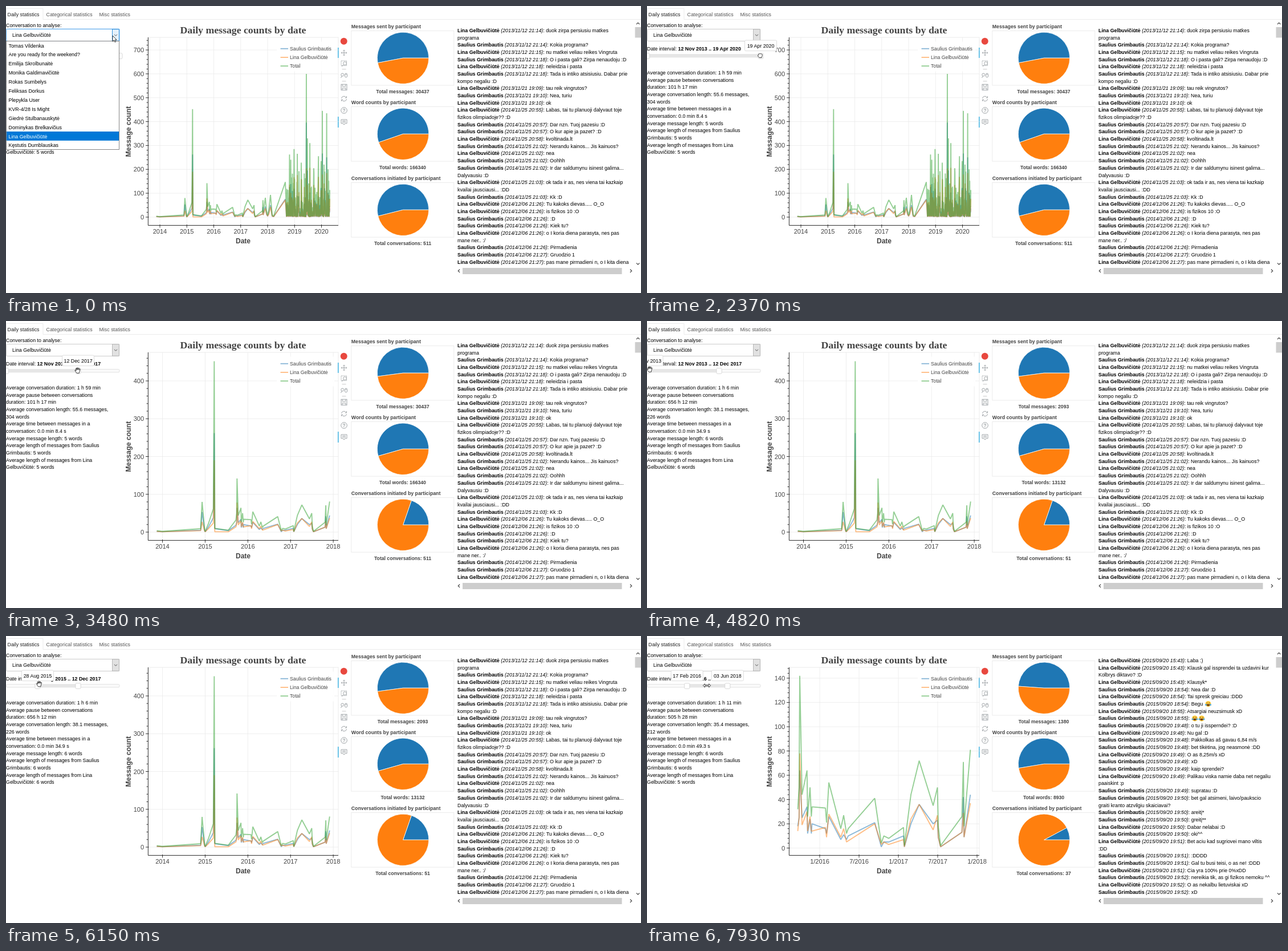
Recreate the animation shown at these times as an HTML page. Size 1114 by 503 pixels, loop 7.99 s.

```html
<!DOCTYPE html>
<html lang="lt">
<head>
<meta charset="utf-8">
<title>Daily statistics</title>
<style>
html, body { margin: 0; width: 100%; height: 100%; overflow: hidden; background: #fff; }
svg { display: block; font: 8.85px Arial, "Liberation Sans", sans-serif; }
.b { font-weight: bold; }
.i { font-style: italic; }
.m { text-anchor: middle; }
.e { text-anchor: end; }
.ink { fill: #444; }
.line { fill: none; stroke-width: 1.9; stroke-opacity: .5; stroke-linejoin: bevel; }
.icon { fill: none; stroke: #a1a6a9; stroke-width: 1; }
.cur { fill: #fff; stroke: #000; stroke-width: .75; stroke-linejoin: round; }
</style>
</head>
<body>
<svg id="stage" width="1114" height="503" viewBox="0 0 1114 503">
  <defs><clipPath id="plot"><rect x="249" y="55" width="334" height="329"/></clipPath></defs>
  <g id="frame"></g>
  <g id="chart"></g>
  <g id="legend"></g>
  <g id="pies"></g>
  <g id="totals"></g>
  <g id="stats"></g>
  <g id="log"></g>
  <g id="picker"></g>
  <g id="slider"></g>
  <g id="menu"></g>
  <g id="cursor"></g>
</svg>
<script>
const LOOP = 7990, SPAN = 2350;
const SAULIUS = 'Saulius Grimbautis', LINA = 'Lina Gelbuvičiūtė';
const BLUE = '#1f77b4', ORANGE = '#ff7f0e', GREEN = '#2ca02c';

const $ = id => document.getElementById(id);
const text = (x, y, s, cls = '', more = '') => `<text x="${x}" y="${y}" class="${cls}" ${more}>${s}</text>`;
const rect = (x, y, w, h, more = '') => `<rect x="${x}" y="${y}" width="${w}" height="${h}" ${more}/>`;
const path = (d, more = '') => `<path d="${d}" ${more}/>`;
const size = n => `font-size="${n}"`;

// Redraws a group only when its content changes.
const drawn = {};
function put(id, html) {
  if (drawn[id] !== html) $(id).innerHTML = drawn[id] = html;
}

/* ---------- chart ---------- */
const months = ['1/2016', '7/2016', '1/2017', '7/2017', '1/2018'];
const years = (a, b) => Array.from({ length: b - a + 1 }, (_, i) => [a + i, a + i]);
const views = [
  { year: 2014, x: 270, w: 47.25, y: 370, u: .4185, step: 100, max: 700, from: 0, to: 2021, ticks: years(2014, 2020) },
  { year: 2014, x: 274.5, w: 74.9, y: 370, u: .6625, step: 100, max: 400, from: 0, to: 2017.92, ticks: years(2014, 2018) },
  { year: 2016, x: 303, w: 138, y: 371.7, u: 2.127, step: 20, max: 140, from: 2015.71, to: 2017.92,
    ticks: months.map((s, i) => [2016 + i / 2, s]) }
];

// Triplets: plot x in the given view, total, first person's share.
function points(v, list) {
  const out = [];
  for (let i = 0; i < list.length; i += 3)
    out.push([v.year + (list[i] - v.x) / v.w, list[i + 1], list[i + 2]]);
  return out;
}

function busyDays() {
  const gap = .36;
  let seed = 4711;
  const rnd = () => (seed = seed * 16807 % 2147483647) / 2147483647;
  const peaks = { 497.5: 262, 499.5: 240, 505.5: 285, 511: 265, 518: 228, 527: 600, 528.6: 330, 533: 310,
    540: 205, 548: 255, 553: 235, 555: 445, 558: 220, 562.5: 435, 565: 200 };
  const list = [];
  for (let x = 492; x < 568; x += gap) {
    const top = Object.keys(peaks).find(p => Math.abs(p - x) <= gap / 2);
    const n = top ? peaks[top] : 3 + 190 * rnd() ** 3.5;
    list.push(x, n, n * (n === 600 ? .66 : .3 + .35 * rnd()));
  }
  return list;
}

const data = [
  ...points(views[1], [264.5, 4, 2, 274, 2, 1, 341.5, 9, 5, 344, 80, 53, 348.5, 6, 3, 349.5, 2, 1, 355, 22, 13,
    363.8, 62, 38, 365.3, 452, 262, 366.3, 10, 9, 390, 5, 4]),
  ...points(views[2], [264.5, 32, 18, 266.8, 50, 25, 268, 142, 64, 272, 44, 25, 280.7, 64, 34, 281.8, 26, 12,
    286, 50, 24, 288.3, 26, 12, 289.5, 34, 20, 313, 33, 16, 315, 21, 12, 319, 54, 26, 340, 16, 7, 345, 27, 11,
    350, 12, 7, 353, 16, 10, 399.5, 41, 21, 411, 4, 1, 415.5, 10, 5, 424, 8, 5, 450, 17, 10, 451.5, 2, 1,
    463, 44, 20, 477.5, 72, 36, 502, 35, 20, 509.5, 50, 23, 511, 18, 9, 515, 2, 1, 552.5, 26, 13, 555, 71, 42,
    556.2, 18, 9, 567.3, 81, 44]),
  ...points(views[0], [457, 25, 12, 459, 8, 4, 461, 30, 18, 464, 93, 50, 467, 8, 4, 469.5, 4, 2, 490, 147, 75, 491.5, 50, 26]),
  ...points(views[0], busyDays())
];

function chart(v) {
  const px = y => v.x + (y - v.year) * v.w, py = n => v.y - n * v.u;
  let grid = '', ticks = '', minor = '', labels = '';
  for (const [at, name] of v.ticks) {
    const x = px(at);
    grid += `M${x} 55V384`;
    ticks += `M${x} 383V388.5`;
    labels += text(x, 399, name, 'm ink', size(11));
  }
  for (let n = 0; py(n) > 55; n += v.step / 5) {
    const y = py(n);
    if (n % v.step) { minor += `M246.5 ${y}H249`; continue; }
    grid += `M249 ${y}H583`;
    ticks += `M245 ${y}H250.5`;
    labels += text(242, y + 4, n, 'e ink', size(11));
  }
  const shown = data.filter(p => p[0] >= v.from && p[0] <= v.to);
  const line = (pick, color) => path('M' + shown.map(p => px(p[0]).toFixed(2) + ' ' + py(pick(p)).toFixed(2)).join('L'),
    `class="line" stroke="${color}"`);
  return path(grid, 'stroke="#e9e9e9" stroke-width=".7"') +
    `<g clip-path="url(#plot)">${line(p => p[2], BLUE)}${line(p => p[1] - p[2], ORANGE)}${line(p => p[1], GREEN)}</g>` +
    path('M249.4 55V384.5H583' + ticks + minor, 'fill="none" stroke="#222" stroke-width=".9"') + labels;
}
const charts = views.map(chart);

/* ---------- pies ---------- */
const tops = [91.2, 224.3, 357.3];
const shares = [[.53, .553, .539], [.521, .544, .197], [.489, .526, .078]];
const kinds = ['messages', 'words', 'conversations'];
const sums = [[30437, 166340, 511], [2093, 13132, 51], [1380, 8930, 37]];

function pie(cy, share) {
  const r = 45.2, a = share * 2 * Math.PI, x = 696.5 + r * Math.cos(a), y = cy - r * Math.sin(a);
  const big = share > .5 ? 1 : 0;
  const wedge = (sweep, large, color) =>
    path(`M696.5 ${cy}h${r}A${r} ${r} 0 ${large} ${sweep} ${x} ${y}Z`, `fill="${color}" stroke="#fff" stroke-width=".75"`);
  return wedge(0, big, BLUE) + wedge(1, 1 - big, ORANGE);
}
const pies = shares.map(s => s.map((n, i) => pie(tops[i], n)).join(''));
const totals = sums.map(s => s.map((n, i) =>
  text(696, tops[i] + 62, `Total ${kinds[i]}: ${n}`, 'b m ink', size(8.65))).join(''));

/* ---------- left column ---------- */
const stats = [
  ['1 h 59 min', '101 h 17 min', '55.6', 304, '8.4', 5, 5, 5],
  ['1 h 6 min', '656 h 12 min', '38.1', 226, '34.9', 6, 6, 6],
  ['1 h 11 min', '505 h 28 min', '35.4', 212, '49.3', 6, 6, 5]
].map(([len, pause, msgs, words, gap, all, one, two]) => [
  `Average conversation duration: ${len}`, 'Average pause between conversations', `duration: ${pause}`,
  `Average conversation length: ${msgs} messages,`, `${words} words`, 'Average time between messages in a',
  `conversation: 0.0 min ${gap} s`, `Average message length: ${all} words`,
  'Average length of messages from ' + SAULIUS.split(' ')[0], `${SAULIUS.split(' ')[1]}: ${one} words`,
  'Average length of messages from ' + LINA.split(' ')[0], `${LINA.split(' ')[1]}: ${two} words`
].map((s, i) => text(0, 120.1 + 12.65 * i, s)).join(''));

const people = ['Tomas Vildenka', 'Are you ready for the weekend?', 'Emilija Skrolbunaitė', 'Monika Galdimavičiūtė',
  'Rokas Sumbelys', 'Feliksas Dorkus', 'Plepykla User', 'KVR-4/28 Is Might', 'Giedrė Stulbanauskytė',
  'Dominykas Brelkavičius', LINA, 'Kęstutis Dumblauskas'];
const menu = rect(.5, 61.5, 198, 190, 'fill="#fff" stroke="#7a7a7a" stroke-width=".9"') +
  rect(1, 220, 197, 15.9, 'fill="#0078d7"') +
  people.map((s, i) => text(4.5, 72.5 + 15.9 * i, s, '', i === 10 ? 'fill="#fff"' : '')).join('');

function picker(focus) {
  const edge = focus ? '#5aaaec' : '#ccc';
  return (focus ? rect(-1, 39.2, 201, 23.8, 'rx="3" fill="#d3e8fa"') : '') +
    rect(.5, 40.5, 198, 21, `rx="2" fill="#fff" stroke="${edge}" stroke-width="1"`) +
    rect(186.5, 40.8, 12, 20.4, focus ? 'fill="#e5f1fb" stroke="#0078d7" stroke-width=".8"' : 'fill="#e1e1e1" stroke="#adadad" stroke-width=".8"') +
    path('M190 49.8L192.5 52.3L195 49.8', 'fill="none" stroke="#444" stroke-width=".9"') + text(11, 54.2, LINA);
}

const pos = day => day * 199.5 / SPAN;
const date = day => new Date(Date.UTC(2013, 10, 12 + Math.round(day)))
  .toLocaleDateString('en-GB', { day: '2-digit', month: 'short', year: 'numeric', timeZone: 'UTC' });
const handle = x => rect(x - 4.6, 82.8, 9.2, 9.6, 'rx="2" fill="#fff" stroke="#d0d0d0" stroke-width=".8"');
const tip = day => rect(pos(day) - 28, 60, 56, 18.6, 'rx="2" fill="#fff" stroke="#d4d4d4" stroke-width=".8"') +
  text(pos(day), 72.6, date(day), 'm');

function slider(a, b, tipA, tipB) {
  return text(0, 77.6, `Date interval: <tspan class="b">${date(a)} .. ${date(b)}</tspan>`) +
    rect(.3, 84.7, 198.8, 5.2, 'rx="2" fill="#fafafa" stroke="#d6d6d6" stroke-width=".7"') +
    rect(pos(a), 85, pos(b) - pos(a), 4.6, 'fill="#e6e6e6"') +
    handle(pos(a)) + handle(pos(b)) + (tipA ? tip(a) : '') + (tipB ? tip(b) : '');
}

/* ---------- message log: S / L is the speaker, a leading space continues ---------- */
const logs = [`L2013/11/12 21:14 duok zirpa persiusiu matkes
 programa
S2013/11/12 21:14 Kokia programa?
L2013/11/12 21:15 nu matkei veliau reikes Vingruta
S2013/11/12 21:18 O i pasta gali? Zirpa nenaudoju :D
L2013/11/12 21:18 neleidzia i pasta
S2013/11/12 21:18 Tada is intiko atsisiusiu. Dabar prie
 kompo negaliu :D
L2013/11/21 19:09 tau reik vingrutos?
S2013/11/21 19:10 Nea, turiu
L2013/11/21 19:10 ok
L2014/11/25 20:55 Labas, tai tu planuoji dalyvaut toje
 fizikos olimpiadoje?? :D
S2014/11/25 20:57 Dar nzn. Tuoj pazesiu :D
S2014/11/25 20:57 O kur apie ja pazet? :D
L2014/11/25 20:58 kvoltinada.lt
S2014/11/25 21:02 Nerandu kainos... Jis kainuos?
L2014/11/25 21:02 nea
S2014/11/25 21:02 Oohhh
S2014/11/25 21:02 Ir dar saldumynu isinest galima...
 Dalyvausiu :D
L2014/11/25 21:03 ok tada ir as, nes viena tai kazkaip
 kvailai jausciausi... :DD
S2014/11/25 21:03 Kk :D
L2014/12/06 21:26 Tu kakoks dievas..... O_O
L2014/12/06 21:26 is fizikos 10 :O
S2014/12/06 21:26 :D
S2014/12/06 21:26 Kiek tu?
L2014/12/06 21:26 o I koria diena parasyta, nes pas
 mane ner.. :/
S2014/12/06 21:26 Pirmadienia
S2014/12/06 21:27 Gruodzio 1
L2014/12/06 21:27 pas mane pirmadieni n, o I kita diena`,
`L2015/09/20 15:43 Laba :)
L2015/09/20 15:43 Klausk gal issprendei ta uzdavini kur
 Kolbrys diktavo? :D
L2015/09/20 15:43 Klausyk*
S2015/09/20 18:54 Nea dar :D
L2015/09/20 18:54 Tai spresk greiciau :DDD
S2015/09/20 18:54 Begu
L2015/09/20 18:55 Atsargiai neuzsimusk xD
S2015/09/20 18:55 
S2015/09/20 19:48 o tu ji issperndei? :D
L2015/09/20 19:48 Nu gal :D
S2015/09/20 19:48 Pakkolkas aš gavau 6,84 m/s
S2015/09/20 19:48 bet tikėtina, jog neasmonė :DD
L2015/09/20 19:49 O as 8,25m/s xD
S2015/09/20 19:49 xD
S2015/09/20 19:49 kaip sprendei?
L2015/09/20 19:49 Palikau viska namie daba net negaliu
 paaiskint :p
S2015/09/20 19:49 supratau :D
S2015/09/20 19:50 bet gal atsimeni, laivo/paukscio
 graiti kranto atzvilgiu skaiciavai?
S2015/09/20 19:50 areitį*
S2015/09/20 19:50 greitį**
L2015/09/20 19:50 Dabar nelabai :D
S2015/09/20 19:50 oki^^
L2015/09/20 19:51 Bet aciu kad sugriovei mano viltis
 :DD
S2015/09/20 19:51 :DDDD
S2015/09/20 19:51 Gal tu busi teisi, o as ne! :DDD
L2015/09/20 19:51 Cia yra 100% prie 0%xDD
S2015/09/20 19:52 nereikia tik, as gi fizikos nemoku ^^
L2015/09/20 19:52 O as nekalbu lietuviskai xD
S2015/09/20 19:52 xD`
].map(s => s.split('\n').map((row, i) => {
  const body = row[0] === ' ' ? row.slice(1) :
    `<tspan class="b">${row[0] === 'S' ? SAULIUS : LINA}</tspan> <tspan class="i">(${row.slice(1, 17)})</tspan>: ${row.slice(18)}`;
  return text(792, 46.1 + 12.67 * i, body);
}).join(''));

const laugh = (x, y) => `<g transform="translate(${x} ${y})"><circle r="5" fill="#fbc93d"/>` +
  path('M-3 .4H3Q2.6 3.7 0 3.7T-3 .4Z', 'fill="#6b3a12"') +
  path('M-3 -1.4Q-2 -2.8 -1 -1.4M1 -1.4Q2 -2.8 3 -1.4', 'fill="none" stroke="#6b3a12" stroke-width=".8"') +
  '<circle cx="-4" cy="1.4" r="1.5" fill="#4aa9e0"/><circle cx="4" cy="1.4" r="1.5" fill="#4aa9e0"/></g>';
logs[1] += laugh(984.5, 119) + laugh(961, 144.4) + laugh(973, 144.4);

/* ---------- fixed parts ---------- */
const at = (y, inner) => `<g transform="translate(593 ${y})" class="icon">${inner}</g>`;
function frame() {
  const border = 'fill="none" stroke="#e6e6e6" stroke-width=".8"';
  let s = path('M.4 23.5V4.4H65V23.5H1114', border) +
    text(2.5, 17.8, 'Daily statistics', '', 'fill="#222"') +
    text(70.5, 17.8, 'Categorical statistics', '', 'fill="#555"') +
    text(163.5, 17.8, 'Misc statistics', '', 'fill="#555"') +
    text(0, 37.2, 'Conversation to analyse:') +
    text(416, 48.3, 'Daily message counts by date', 'b m ink', 'style="font:bold 17.75px \'Times New Roman\',\'Liberation Serif\',serif"') +
    rect(249, 55, 334, 329, border) +
    text(416, 416, 'Date', 'b m ink', size(12)) +
    text(0, 0, 'Message count', 'b m ink', size(12.3) + ' transform="translate(219 220) rotate(-90)"');
  ['Messages sent', 'Word counts', 'Conversations initiated'].forEach((name, i) => {
    s += rect(605.8, tops[i] - 47.8, 180, 95.6, border) +
      text(605.8, tops[i] - 52, name + ' by participant', 'b ink', size(8.75));
  });
  s += '<circle cx="592.7" cy="61.7" r="6" fill="#e8483f"/>' +
    path('M582.8 73V91M582.8 194V213', 'stroke="#26aae1" stroke-width="1.3"') +
    path('M589.5 110.8H596.5M589.5 131.8H596.5', 'stroke="#bbb" stroke-width=".8"') +
    at(82, path('M-5 0H5M0 -5V5M-3.5 -1.5L-5 0L-3.5 1.5M3.5 -1.5L5 0L3.5 1.5M-1.5 -3.5L0 -5L1.5 -3.5M-1.5 3.5L0 5L1.5 3.5')) +
    at(101, rect(-5, -5, 9.5, 8.5, 'stroke-dasharray="1.6 1"') + '<circle cx="1.5" cy="-.5" r="2.8"/>' + path('M-.5 1.5L-4 5')) +
    at(122, '<circle cx="-2.8" cy="-1.5" r="2.5"/>' + path('M-4 1L-5.5 4') + rect(1.5, -4, 4, 7, 'rx="2"') + path('M3.5 -3V-1')) +
    at(142.3, rect(-5, -5, 10, 10) + path('M-2.8 -5V-1.5H2.8V-5M-3 5V1.5H3V5')) +
    at(162.5, path('M-4.5 -.5A4.5 4.2 0 0 1 4 -2M4.5 -4.4V-1.6H1.8M4.5 .5A4.5 4.2 0 0 1 -4 2M-4.5 4.4V1.6H-1.8')) +
    at(183, '<circle r="5.3"/>' + text(0, 3, '?', 'b m', 'fill="#a1a6a9" stroke="none"')) +
    at(203.3, path('M-5 -4.3H5V2.5H1.5L0 4.8L-1.5 2.5H-5ZM-3 -2H3M-3 .2H3'));
  s += rect(1103.5, 37, 10.5, 18.5, 'fill="#cdcdcd"') + rect(801, 459, 279.5, 11, 'fill="#cdcdcd"') +
    path('M1106 32L1108.7 29.3L1111.4 32M1106 450.5L1108.7 453.2L1111.4 450.5M796 461.5L793.3 464.2L796 467M1095 461.5L1097.7 464.2L1095 467',
      'fill="none" stroke="#505050" stroke-width="1.3"');
  return s;
}

function legend() {
  return rect(475, 62.5, 101, 52, 'fill="#fff" fill-opacity=".95"') +
    [[SAULIUS, BLUE], [LINA, ORANGE], ['Total', GREEN]].map(([name, color], i) => {
      const y = 74.8 + 15.2 * i;
      return path(`M481.5 ${y}H495`, `class="line" stroke="${color}"`) + text(498, y + 3.1, name, 'ink', size(8.7));
    }).join('');
}

/* ---------- motion ---------- */
const cursors = {
  arrow: 'M0 0V10.2L2.4 8L4 11.4L5.6 10.7L4.1 7.3H7.2Z',
  hand: 'M-1.5 4.8L-4.5 .5Q-4.8 -1 -3.4 -.6L-2.4 .6L-3 -3.2Q-2.8 -4.4 -1.8 -3.6L-1 -1V-4.4Q-.4 -5.4 .3 -4.4L.5 -1.2L1.4 -4Q2.3 -4.7 2.6 -3.8L2.3 -.8L3.6 -2.5Q4.6 -2.8 4.5 -1.7L3.4 2L2.8 4.8Z',
  fist: 'M-1.6 4L-4 1Q-4.2 -.4 -2.9 -.4V-2Q-2 -3.4 -1 -2.4Q0 -3.6 1 -2.5Q2 -3.2 2.6 -2.1Q3.8 -2.4 3.9 -1L3.2 2L2.7 4Z',
  resize: 'M-6.8 0L-3.6 -3V-.9H3.6V-3L6.8 0L3.6 3V.9H-3.6V3Z'
};
const smooth = k => k * k * (3 - 2 * k);
const settle = k => 1 - (1 - k) ** 2.7;

// Progress 0..1 in n visible steps; the first step lands at a, the last at b.
function steps(t, a, b, n, ease = smooth) {
  if (t < a) return 0;
  return ease(Math.min(n, Math.floor((t - a) / ((b - a) / (n - 1)) + 1e-6) + 1) / n);
}
const mix = (a, b, k) => a + (b - a) * k;

function pointer(t, a, b) {
  if (t < 1820) {
    const k = steps(t, 1460, 1670, 4);
    return ['arrow', mix(187, 195, k), mix(52, 79.5, k)];
  }
  if (t < 2370) return ['hand', 198.5, 84.6];
  if (t < 4130) return [t < 3120 ? 'fist' : 'hand', pos(b) - 1, 86.5];
  if (t < 4970) {
    const k = steps(t, 4130, 4820, 11), x = mix(126, 4.5, k);
    return [x > 9 && x < 119 ? 'resize' : 'hand', x, mix(86.5, 84.5, k)];
  }
  if (t < 6850) return [t < 6150 ? 'fist' : 'hand', pos(a) + mix(4.5, 2.5, a / 654), 84];
  const x = mix(58, 86, steps(t, 6850, 7290, 7)) + 19 * steps(t, 7720, 7930, 4);
  return [x > 62 ? 'resize' : 'hand', x, x > 62 ? 86.8 : 84];
}

function render(t) {
  const shift = 173 * steps(t, 7720, 7930, 4);
  const a = 654 * steps(t, 5340, 6060, 11) + shift;
  const b = mix(SPAN, 1491, steps(t, 2430, 3120, 12, settle)) + shift;
  const stage = (first, second) => (t >= first) + (t >= second);
  put('chart', charts[stage(3360, 6420)]);
  put('pies', pies[stage(3480, 6480)]);
  put('totals', totals[stage(4130, 6850)]);
  put('stats', stats[stage(4130, 6910)]);
  put('log', logs[+(t >= 6850)]);
  put('picker', picker(t < 2370));
  put('slider', slider(a, b, (t >= 4820 && t < 6920) || t >= 7720, (t >= 2370 && t < 4130) || t >= 7720));
  put('menu', t < 210 ? menu : '');
  const [shape, x, y] = pointer(t, a, b);
  put('cursor', path(cursors[shape], `class="cur" transform="translate(${x} ${y})"`));
}

put('frame', frame());
put('legend', legend());
const start = performance.now();
function tick() {
  render((performance.now() - start) % LOOP);
  requestAnimationFrame(tick);
}
tick();
</script>
</body>
</html>
```
